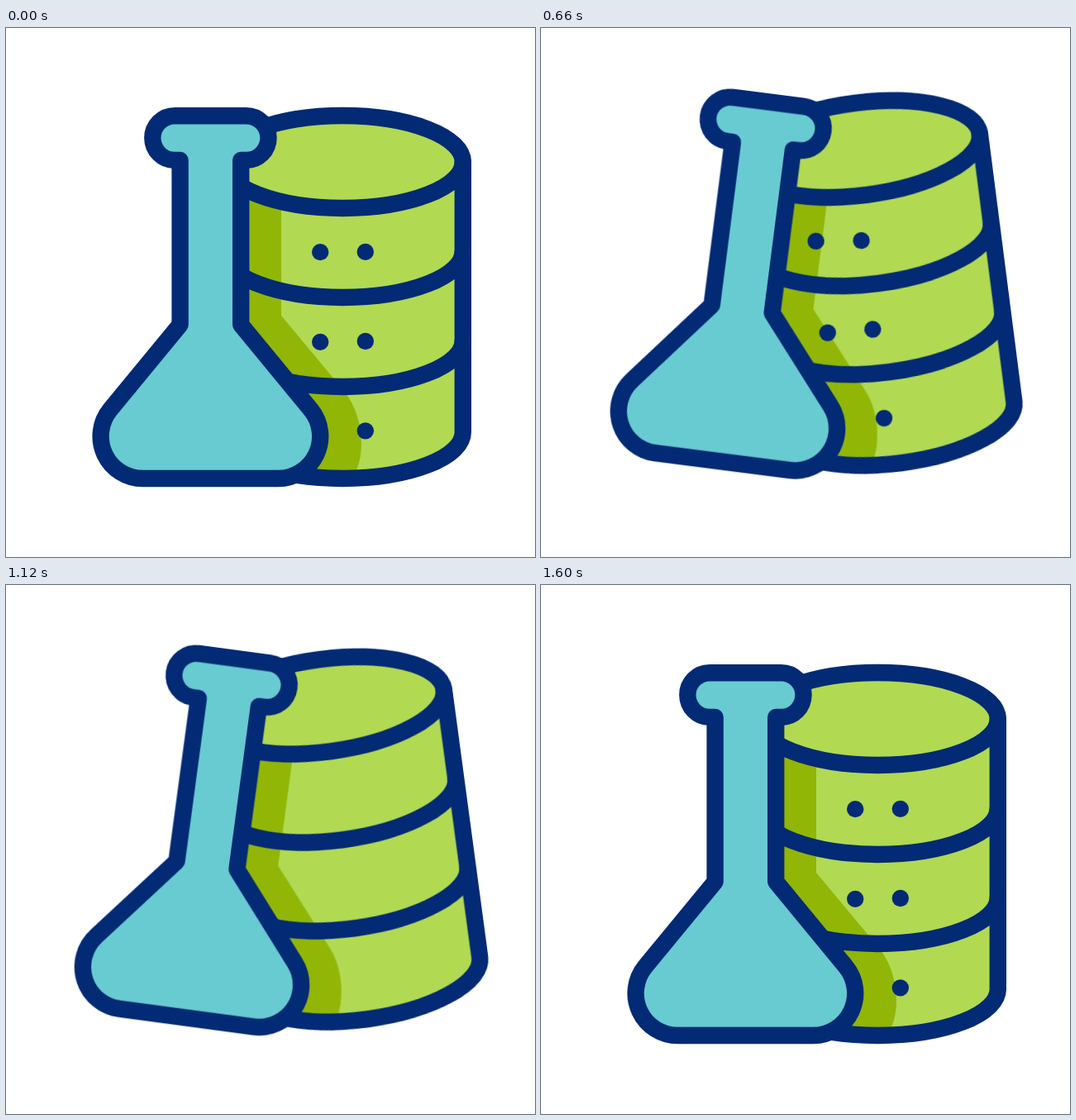
Write an HTML page that moves like this. It is 640 px wide and 640 px high and loops after 1.82 s.

```html
<!DOCTYPE html>
<html lang="en">
<head>
<meta charset="utf-8">
<title>Flask and database</title>
<style>
  @property --shift { syntax: "<number>"; inherits: true; initial-value: 0; }

  html, body { margin: 0; width: 100%; height: 100%; overflow: hidden; background: #fff; }
  svg { display: block; width: 100vw; height: 100vh; }

  .line { fill: none; stroke: #032a75; stroke-width: 20.4; stroke-linecap: round; stroke-linejoin: round; }
  .glass { fill: #67cbd1; }
  .body { fill: #b1d952; }
  .shade { fill: #91b606; }

  .flask, .drum, .undrum {
    animation: 1820ms cubic-bezier(.333, 0, .667, 1) infinite;
  }
  .flask { transform-origin: 247.4px 325.5px; animation-name: flask; }
  .drum, .undrum { transform-origin: 407.5px 325.5px; }
  .drum { animation-name: drum; }
  .undrum { animation-name: undrum; }

  @keyframes flask {
    0%, 10.989%, 87.912%, 100% { transform: translateY(0px) rotate(0deg); }
    49.451% { transform: translateY(-25.5px) rotate(10deg); }
  }
  @keyframes drum {
    0%, 10.989%, 87.912%, 100% { transform: translateY(0px) rotate(0deg); }
    49.451% { transform: translateY(-23.2px) rotate(-10deg); }
  }
  /* exact inverse of drum, so the shadow can follow the flask inside the drum's clip */
  @keyframes undrum {
    0%, 10.989%, 87.912%, 100% { transform: rotate(0deg) translateY(0px); }
    49.451% { transform: rotate(10deg) translateY(23.2px); }
  }

  /* the dots circle the drum: a small swing right, off to the left, back in from the right */
  .dots { fill: #032a75; animation: orbit 1820ms cubic-bezier(.333, 0, .667, 1) infinite; }
  @keyframes orbit {
    0%, 10.989% { --shift: 0; }
    25.66% { --shift: 38; }
    49.451% { --shift: -148; }
    49.46%, 62.25% { --shift: 247; }
    87.912%, 100% { --shift: 0; }
  }
  .dots circle {
    --x: calc(var(--shift) + var(--home));
    --r: max(var(--x), 0);
    --l: min(var(--x), 0);
    transform: translate(calc(var(--x) * 1px),
      calc((var(--r) * var(--r) * .0018 + var(--l) * var(--l) * var(--bend)) * -1px));
  }
  .left { --home: -27.3; }
  .right { --home: 27.3; }
  .top { --bend: .0014; }
  .mid { --bend: .0006; }
</style>
</head>
<body>
<svg viewBox="0 0 640 640">
  <defs>
    <clipPath id="front">
      <path d="M262.2 162A145.3 56 0 0 0 552.8 162V489A145.3 56 0 0 1 262.2 489Z"/>
    </clipPath>
  </defs>

  <g class="drum">
    <path class="body" d="M262.2 162A145.3 56 0 0 1 552.8 162V489A145.3 56 0 0 1 262.2 489Z"/>
    <g clip-path="url(#front)">
      <g class="undrum">
        <path class="shade flask" d="M200 120H333V348L408 438C423 456 430 480 430 503C430 514 428 525 424 535L414 565H200Z"/>
      </g>
      <g class="dots">
        <circle class="left top" cx="407.5" cy="272.2" r="10.2"/>
        <circle class="right top" cx="407.5" cy="272.2" r="10.2"/>
        <circle class="left mid" cx="407.5" cy="380.3" r="10.2"/>
        <circle class="right mid" cx="407.5" cy="380.3" r="10.2"/>
        <circle class="right mid" cx="407.5" cy="488.7" r="10.2"/>
      </g>
    </g>
    <g class="line">
      <ellipse cx="407.5" cy="162" rx="145.3" ry="56"/>
      <path d="M262.2 162V489A145.3 56 0 0 0 552.8 489V162"/>
      <path d="M262.2 270A145.3 56 0 0 0 552.8 270"/>
      <path d="M262.2 378A145.3 56 0 0 0 552.8 378"/>
    </g>
  </g>

  <g class="flask">
    <path class="line glass" style="fill:#67cbd1" d="M204.2 106.2H290.6A26.9 26.9 0 0 1 290.6 160H284.2V359L368.6 461.6A51 51 0 0 1 329.2 545H165.6A51 51 0 0 1 126.2 461.6L210.6 359V160H204.2A26.9 26.9 0 0 1 204.2 106.2Z"/>
  </g>
</svg>
</body>
</html>
```
